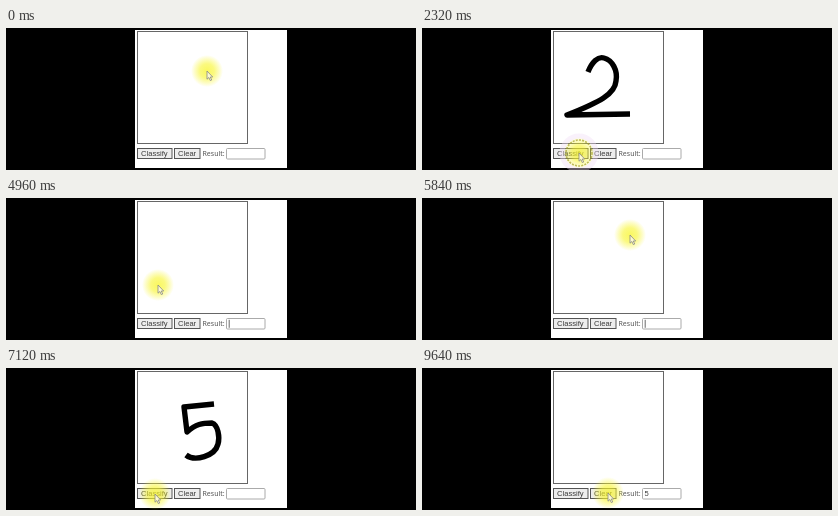
These frames come from a looping animation (410x142 px, 9720 ms). An HTML page:

```html
<!DOCTYPE html>
<html lang="en">
<head>
<meta charset="utf-8">
<title>Digit classifier</title>
<style>
  html, body { margin: 0; width: 100%; height: 100%; overflow: hidden; background: #000; }
  svg { display: block; width: 100vw; height: 100vh; }
  text { font: 7.6px "Liberation Sans", Arial, sans-serif; fill: #3a3a3a; }
  .label { font: 7px "Noto Sans", "Open Sans", sans-serif; fill: #555; }
  .button { fill: #ededed; stroke: #555; }
  .ink { fill: none; stroke: #000; stroke-width: 5.4; stroke-linejoin: round; }
</style>
</head>
<body>
<svg viewBox="0 0 410 142">
  <defs>
    <radialGradient id="glow" stop-color="#f8f52a">
      <stop offset="0" stop-color="#f8f52a" stop-opacity=".75"/>
      <stop offset=".45" stop-color="#f8f52a" stop-opacity=".6"/>
      <stop offset=".75" stop-color="#f8f52a" stop-opacity=".28"/>
      <stop offset="1" stop-color="#f8f52a" stop-opacity="0"/>
    </radialGradient>
  </defs>
  <rect x="129" y="2" width="152" height="138" fill="#fff"/>
  <rect x="131.5" y="3.5" width="110" height="112" fill="#fff" stroke="#666"/>
  <path class="ink" id="two" d="M166 44C170 34 176 28 182 30C190 32 196 42 194 53C193 66 178 74 145 87L208 86"/>
  <path class="ink" id="five" d="M208 36L178 39L181 64C190 56 196 55 206 55C212 57 214 69 212 76C209 88 189 94 180 87"/>
  <rect class="button" x="131.5" y="120.5" width="34.5" height="10"/>
  <rect class="button" x="168.5" y="120.5" width="25.5" height="10"/>
  <text x="135" y="128.2">Classify</text>
  <text x="172" y="128.2">Clear</text>
  <text class="label" x="196.5" y="128">Result:</text>
  <rect x="220.5" y="120.5" width="38.5" height="10.5" rx="1" fill="#fff" stroke="#aaa"/>
  <text id="result" x="222.5" y="128.2"></text>
  <path id="caret" d="M0 121.8V129.8" stroke="#444" stroke-width=".8"/>
  <g id="pointer">
    <circle r="16" cy="1" fill="url(#glow)"/>
    <g id="ring" fill="none">
      <circle r="17" cy="1" stroke="#f0dcf5" stroke-opacity=".4" stroke-width="5"/>
      <circle r="13" cy="1" stroke="#aaa52c" stroke-opacity=".75" stroke-width="1.6" stroke-dasharray="2 1.2"/>
    </g>
    <path d="M0 1V9.2L1.9 7.5L3.3 10.6L4.7 10L3.3 7H5.7Z" fill="#fdfad0" stroke="#888" stroke-width=".8"/>
  </g>
</svg>
<script>
const LOOP = 9720, STEP = 40, INK_LAG = 50, CLICK = 240, BLINK = 530;
const $ = id => document.getElementById(id);
const show = (id, on) => $(id).setAttribute("visibility", on ? "visible" : "hidden");
const point = (x, y) => ({ x, y });

const rounds = [
  { path: $("two"), digit: "2", draw: 840, drawn: 1560, answer: 2600, erase: 4040, empty: 4200, blur: 5920 },
  { path: $("five"), digit: "5", draw: 5920, drawn: 6740, answer: 7800, erase: 9440, empty: LOOP, blur: 9400 }
];
const clicks = [2200, 3960, 7480, 9360];

const along = (path, k) => path.getPointAtLength(k * path.getTotalLength());
const toPen = ({ path }) => along(path, 0);
const clearButton = point(186, 124);

// Free pointer moves; the strokes in between are followed by path.
const moves = [
  { from: 120, to: 760, target: toPen(rounds[0]) },
  { from: 1680, to: 2080, target: point(157, 124) },
  { from: 2960, to: 3600, target: clearButton },
  { from: 4320, to: 4880, target: point(152, 86) },
  { from: 5000, to: 5720, target: toPen(rounds[1]) },
  { from: 6760, to: 7100, target: point(149, 125) },
  { from: 8640, to: 9240, target: clearButton }
];

function ease(t, from, to) {
  const k = Math.min(1, Math.max(0, (t - from) / (to - from)));
  return k * k * (3 - 2 * k);
}

const strokeProgress = (round, t) => ease(t, round.draw, round.drawn);

function pointerAt(t) {
  let at = point(201, 42);
  const events = [...moves.map(m => [m.from, m]), ...rounds.map(r => [r.draw, r])]
    .filter(([from]) => t >= from)
    .sort((a, b) => a[0] - b[0]);
  for (const [, event] of events) {
    if (event.path) {
      at = along(event.path, strokeProgress(event, t));
    } else {
      const k = ease(t, event.from, event.to);
      at = point(at.x + (event.target.x - at.x) * k, at.y + (event.target.y - at.y) * k);
    }
  }
  return at;
}

function render(t) {
  for (const round of rounds) {
    const length = round.path.getTotalLength();
    const inked = strokeProgress(round, t - INK_LAG) * length;
    round.path.setAttribute("stroke-dasharray", `${inked} ${length * 2}`);
    show(round.path.id, inked > 0 && t < round.erase);
  }
  const digit = rounds.find(r => t >= r.answer && t < r.empty)?.digit ?? "";
  const focused = rounds.some(r => t >= r.answer && t < r.blur);
  $("result").textContent = digit;
  $("caret").setAttribute("transform", `translate(${digit ? 227.4 : 223.2})`);
  show("caret", focused && t % (2 * BLINK) >= BLINK);
  show("ring", clicks.some(c => t >= c && t < c + CLICK));

  const { x, y } = pointerAt(t);
  $("pointer").setAttribute("transform", `translate(${x} ${y})`);
}

const start = performance.now();
function tick() {
  const t = (performance.now() - start) % LOOP;
  render(Math.floor(t / STEP) * STEP);
  requestAnimationFrame(tick);
}
tick();
</script>
</body>
</html>
```
